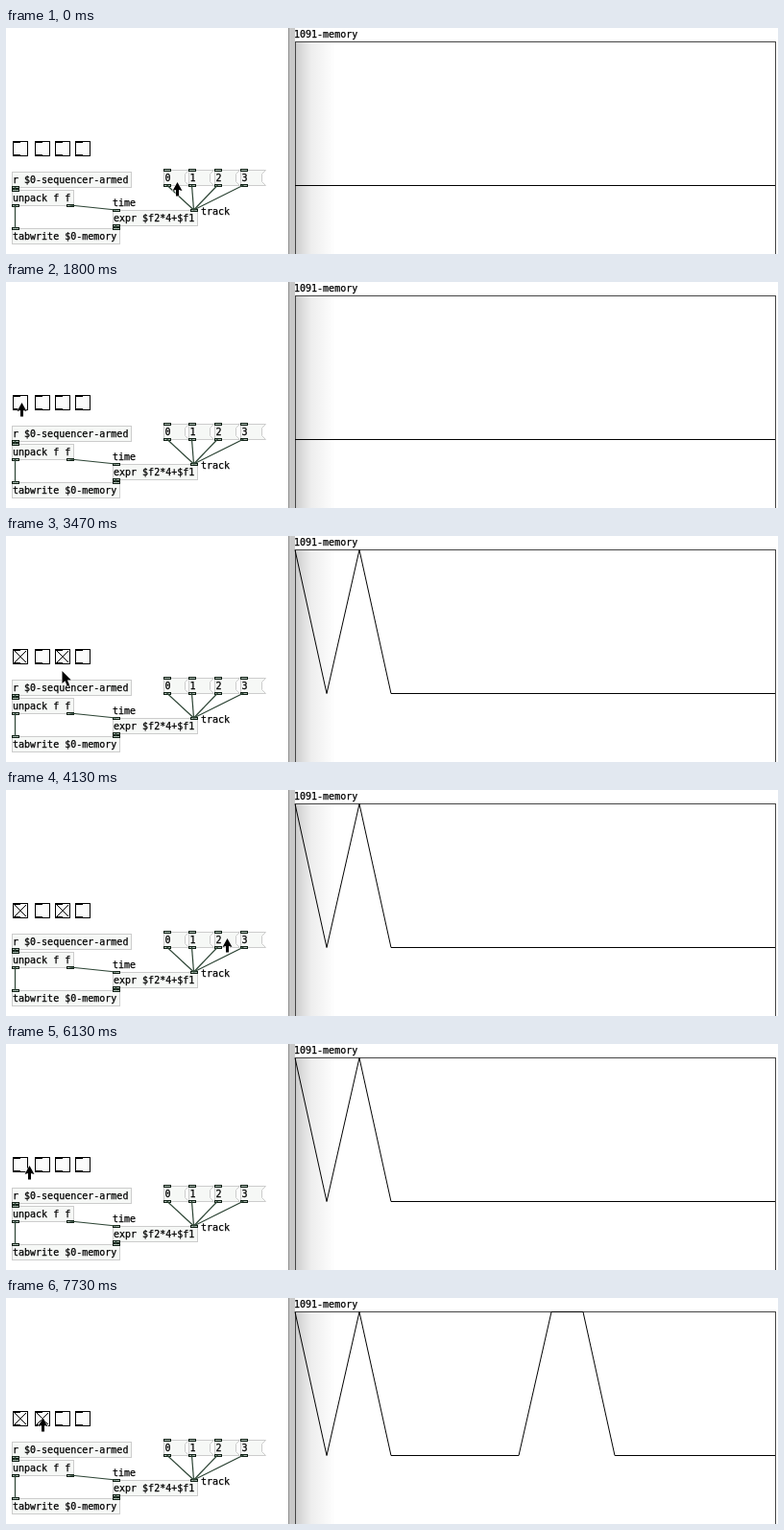
Animation, 804 px wide and 236 px high, one loop 8 s. Source, as an HTML page:

```html
<!DOCTYPE html>
<html lang="en">
<head>
<meta charset="utf-8">
<title>Sequencer patch</title>
<style>
html, body { margin: 0; width: 100%; height: 100%; overflow: hidden; background: #fff; }
svg { display: block; }
text { font: 10px "DejaVu Sans Mono", monospace; white-space: pre; stroke: #000; stroke-width: .25; }
.box { fill: #f6f8f6; stroke: #ccc; }
.port { fill: #a9b8ae; stroke: #102016; }
.wire { stroke: #2c4434; stroke-width: 1.2; }
.crisp { shape-rendering: crispEdges; }
.line { fill: none; stroke: #000; }
.toggle { fill: #fbfbfb; stroke: #000; }
#up, #pointer { stroke: #fff; paint-order: stroke; }
</style>
</head>
<body>
<svg width="804" height="236">
  <defs>
    <linearGradient id="shade">
      <stop offset="0" stop-opacity=".2"/>
      <stop offset=".4" stop-opacity=".07"/>
      <stop offset="1" stop-opacity="0"/>
    </linearGradient>
  </defs>
  <rect x="301" y="14" width="42" height="222" fill="url(#shade)"/>
  <rect x="294" width="7" height="236" fill="#c8c8c8"/>
  <rect x="294" width="1" height="236" fill="#8c8c8c"/>
  <path class="crisp" d="M301.5 236V14.5H801.5V236" fill="none" stroke="#444"/>
  <text x="300" y="10">1091-memory</text>
  <polyline id="graph" class="line"/>
  <g id="patch"></g>
  <g id="toggles"></g>
  <g id="cursor">
    <path id="up" d="M0 -1L5 8L1.5 7V13.5H-1.5V7L-5 8Z"/>
    <path id="pointer" d="M0 0V13L3 10.2L5.2 15.4L7.6 14.4L5.4 9.4H9.4Z"/>
  </g>
</svg>
<script>
const LOOP = 8000;
const $ = id => document.getElementById(id);

// Patch: ports sit at the left and right ends of each object
const label = (x, y, s) => `<text x="${x}" y="${y}">${s}</text>`;
const portX = (o, i) => o.x + i * (o.w - 7);
const ports = (o, n, dy) => Array.from({ length: n }, (_, i) =>
  `<rect class="port crisp" x="${portX(o, i) + .5}" y="${o.y + dy + .5}" width="7" height="2"/>`).join('');
const wire = (from, i, to, j) =>
  `<line class="wire" x1="${portX(from, i) + 3.5}" y1="${from.y + 16}" x2="${portX(to, j) + 3.5}" y2="${to.y}"/>`;
const outline = o => o.flag
  ? `<path class="box" d="M${o.x + .5} ${o.y + .5}h${o.w}l-4 4v8l4 4h-${o.w}z"/>`
  : `<rect class="box crisp" x="${o.x + .5}" y="${o.y + .5}" width="${o.w}" height="16"/>`;
const object = o =>
  outline(o) + label(o.x + (o.flag ? 1.5 : 1), o.y + 12, o.text) + ports(o, o.ins, -1) + ports(o, o.outs, 15);

const receive = { x: 6, y: 150, w: 124, ins: 0, outs: 1, text: 'r $0-sequencer-armed' };
const unpack = { x: 6, y: 169, w: 64, ins: 1, outs: 2, text: 'unpack f f' };
const expr = { x: 111, y: 190, w: 88, ins: 2, outs: 1, text: 'expr $f2*4+$f1' };
const write = { x: 6, y: 209, w: 112, ins: 2, outs: 0, text: 'tabwrite $0-memory' };
const messages = [0, 1, 2, 3].map(i =>
  ({ x: Math.floor(164 + i * 26.7), y: 148, w: 26, ins: 1, outs: 1, text: i, flag: true }));

$('patch').innerHTML =
  [receive, unpack, expr, write, ...messages].map(object).join('') +
  label(111, 186, 'time') + label(203, 195, 'track') +
  messages.map(m => wire(m, 0, expr, 1)).join('') +
  wire(receive, 0, unpack, 0) + wire(unpack, 0, write, 0) +
  wire(unpack, 1, expr, 0) + wire(expr, 0, write, 1);

// Toggles
const toggleX = [7, 30, 51, 72];
$('toggles').innerHTML = toggleX.map(x =>
  `<g transform="translate(${x} 118)">
    <rect class="toggle crisp" x=".5" y=".5" width="15" height="15"/>
    <path class="crisp" d="M0 0h8v2h-8zM0 14h8v2h-8z"/>
    <path class="line cross" d="M2 2L14 14M14 2L2 14"/>
  </g>`).join('');
const crosses = document.querySelectorAll('.cross');

// Times at which each toggle and each array value flips
const toggleFlips = [[1230, 1800, 2000, 5920, 6630], [7730], [3130, 5370], []];
const valueFlips = { 0: [1230, 1800, 2000], 2: [3130], 8: [6630], 9: [7730] };
const isOn = (flips = [], t) => flips.filter(f => f <= t).length % 2 === 1;

// Cursor moves: start, end, x, y
const moves = [
  [30, 130, 169, 160], [330, 1030, 16, 127], [2230, 2500, 43, 126],
  [2870, 3070, 60, 127], [3250, 3470, 58, 141], [3630, 4430, 240, 157],
  [4530, 5120, 62, 128], [5600, 5900, 15, 128], [5950, 6130, 24, 128],
  [6200, 6370, 16, 127], [7300, 7600, 38, 126]
];

function cursorAt(t) {
  let x = 178, y = 162;
  for (const [start, end, toX, toY] of moves) {
    const k = Math.min(1, Math.max(0, (t - start) / (end - start)));
    const ease = 1 - (1 - k) ** 3;
    x += (toX - x) * ease;
    y += (toY - y) * ease;
  }
  return [x, y];
}

const overControl = (x, y) =>
  y >= 118 && y <= 134 && toggleX.some(left => x >= left && x <= left + 17) ||
  y >= 147 && y <= 165 && x >= 164 && x <= 270;

function draw() {
  const t = performance.now() % LOOP;
  crosses.forEach((c, i) => c.style.display = isOn(toggleFlips[i], t) ? '' : 'none');
  $('graph').setAttribute('points', Array.from({ length: 16 }, (_, i) =>
    `${Math.round(301 + i * 100 / 3)},${isOn(valueFlips[i], t) ? 14.5 : 164.5}`).join(' '));

  const [x, y] = cursorAt(t);
  const active = overControl(x, y);
  $('cursor').setAttribute('transform', `translate(${Math.round(x) + .5} ${Math.round(y)})`);
  $('up').style.display = active ? '' : 'none';
  $('pointer').style.display = active ? 'none' : '';
  requestAnimationFrame(draw);
}
draw();
</script>
</body>
</html>
```
